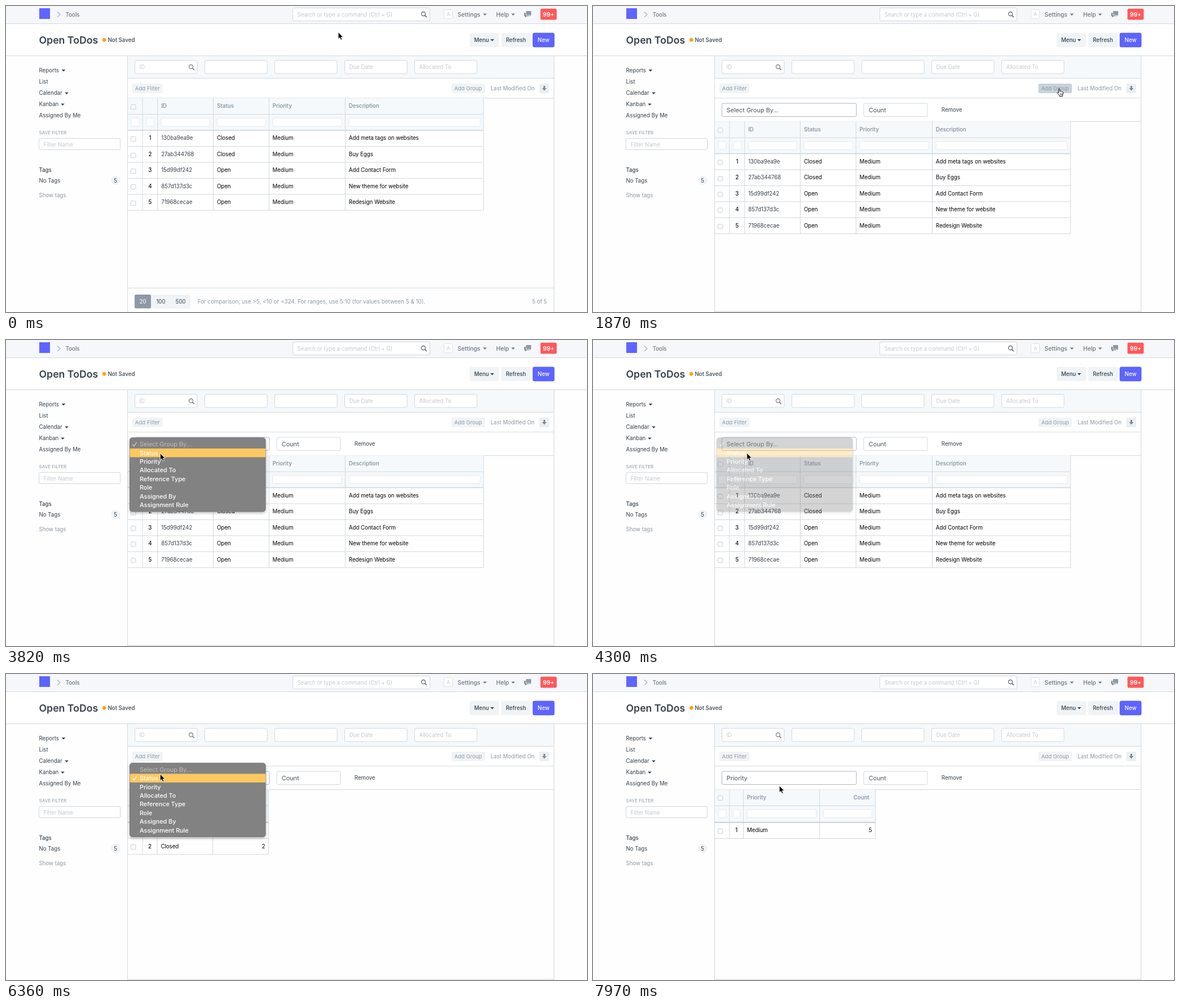
These frames come from a looping animation (1030 px wide and 544 px high, 8 s). An HTML page:

```html
<!DOCTYPE html>
<html lang="en">
<head>
<meta charset="utf-8">
<title>Open ToDos</title>
<style>
  html, body { margin: 0; width: 100%; height: 100%; overflow: hidden; background: #fefefe; }
  svg { display: block; width: 1030px; height: 544px; }
  text { font-family: Inter, "Open Sans", sans-serif; white-space: pre; }
</style>
</head>
<body>
<svg id="stage" xmlns="http://www.w3.org/2000/svg" viewBox="0 0 1030 544"></svg>
<script>
const LOOP = 8000, STEP = 120, ITEM = 15.48;
const LINE = '#d1d8dd', INK = '#36414c', MUTED = '#8d99a6', HINT = '#c3c9cf';
const BUTTON = '#f0f4f7', PRESSED = '#c8d3da', TINT = '#f5f9fc';

// Drawing helpers; text is placed by the middle of its capitals.
const text = (x, y, str, { fill = INK, size = 9.68, weight = 400, anchor = 'start' } = {}) =>
  `<text x="${x}" y="${y + size * 0.364}" fill="${fill}" font-size="${size}" font-weight="${weight}" text-anchor="${anchor}">${
    str.replace(/&/g, '&amp;').replace(/</g, '&lt;')}</text>`;
const rect = (x, y, x2, y2, fill, stroke = 'none', r = 0, attrs = '') =>
  `<rect x="${x}" y="${y}" width="${x2 - x}" height="${y2 - y}" fill="${fill}" stroke="${stroke}" rx="${r}" ${attrs}/>`;
const path = (d, fill = 'none', stroke = 'none', width = 1) =>
  `<path d="${d}" fill="${fill}" stroke="${stroke}" stroke-width="${width}"/>`;
const hLine = (x, x2, y, width = 1, color = LINE) => path(`M${x} ${y}H${x2}`, 'none', color, width);
const vLine = (x, y, y2) => path(`M${x} ${y}V${y2}`, 'none', LINE);
const caret = (x, y, fill = INK) => path(`M${x - 3.3} ${y - 1.5}h6.6l-3.3 3.5z`, fill);
const input = (x, y, x2, y2, hint = '', stroke = LINE) =>
  rect(x + .5, y + .5, x2 - .5, y2 - .5, '#fff', stroke, 2.5) + text(x + 8.5, (y + y2) / 2 + .5, hint, { fill: HINT });
const button = (x, y, x2, y2, label, style, fill = BUTTON, attrs = '') =>
  rect(x, y, x2, y2, fill, 'none', 2.5, attrs) + text((x + x2) / 2, (y + y2) / 2 + .1, label, { anchor: 'middle', ...style });
const lens = (x, y, color) =>
  `<circle cx="${x - 1}" cy="${y - 1}" r="3.5" fill="none" stroke="${color}" stroke-width="1.3"/>` +
  path(`M${x + 1.6} ${y + 1.6}l3.2 3.4`, 'none', color, 1.8);
const group = (id, body) => `<g id="${id}">${body}</g>`;

function header() {
  const nav = { fill: '#6c7680', size: 10.3, weight: 500 };
  return rect(0, 0, 1030, 31.5, '#f5f7fa') + hLine(0, 1030, 31.5) + rect(0, 32, 1030, 88, '#fff') + hLine(0, 1030, 88.5) +
    rect(59, 4, 78, 23, '#5e64ff') +
    path('M91 10.5l5 4.7-5 4.7', 'none', '#a4aeb7', 1.2) +
    text(105.7, 15.5, 'Tools', { fill: '#6c7680', weight: 500 }) +
    input(508, 3, 752, 27, 'Search or type a command (Ctrl + G)') + lens(741, 15, '#5f6973') +
    rect(776.5, 6.5, 791.5, 22.5, '#fff', '#dce2e6', 2) + text(784, 15, 'A', { fill: HINT, size: 9, anchor: 'middle' }) +
    text(800.5, 15, 'Settings', nav) + caret(849, 15, '#6c7680') +
    text(869, 15, 'Help', nav) + caret(899, 15, '#6c7680') +
    path('M922 9h9v7h-1v2.5l-2.5-2.5H922z', '#8d99a6') +
    path('M919 12h2v5h6v1h-4l-2.5 2.5V18H919z', '#6c7680') +
    button(947.5, 4.8, 976.3, 24.5, '99+', { fill: '#fff', size: 10.4, weight: 600 }, '#ff5858') +
    text(58.5, 60.5, 'Open ToDos', { size: 17.7, weight: 600 }) +
    '<circle cx="174.3" cy="60.3" r="3.3" fill="#ffa00a"/>' +
    text(180.5, 60.5, 'Not Saved', { weight: 600, fill: '#4f5963' }) +
    rect(822, 48, 874, 73, BUTTON, 'none', 2.5) + text(830, 60.5, 'Menu', { weight: 500 }) + caret(862, 60.5) +
    button(878, 48, 930, 73, 'Refresh', { weight: 500 }) +
    button(934, 48, 972, 73, 'New', { weight: 500, fill: '#fff' }, '#5e64ff', 'style="stroke:#444bff;stroke-width:.6"');
}

function sidebar() {
  const links = [['Reports', 102], ['List'], ['Calendar', 107.5], ['Kanban', 100.5], ['Assigned By Me']];
  return links.map(([label, x], i) => text(58.5, 114 + i * 20.2, label) + (x ? caret(x, 114.5 + i * 20.2) : '')).join('') +
    text(58.5, 225.5, 'SAVE FILTER', { size: 8.05, fill: MUTED }) + input(58, 235, 203, 256, 'Filter Name') +
    text(58.5, 291, 'Tags', { weight: 500 }) + text(58.5, 310, 'No Tags') +
    rect(186, 302, 202.5, 318, BUTTON, 'none', 8) + text(194.2, 310, '5', { anchor: 'middle' }) +
    text(58.5, 336, 'Show tags', { fill: MUTED });
}

function toolbar() {
  const hints = ['ID', '', '', 'Due Date', 'Allocated To'], small = { size: 9.6, fill: MUTED };
  return rect(216, 89, 971, 128.5, TINT) + hLine(216, 971, 128.5) + rect(216, 129, 971, 163.5, '#fff') +
    hints.map((hint, i) => input(228 + i * 124, 96, 339.5 + i * 124, 120.5, hint)).join('') + lens(329, 109, '#7a858f') +
    button(224, 138, 277.5, 155, 'Add Filter', small) +
    button(789.5, 138, 849, 155, 'Add Group', small, BUTTON, 'id="addGroup"') +
    text(859, 146.7, 'Last Modified On', { fill: MUTED }) +
    rect(945.5, 138, 963, 155, '#ebeff2', 'none', 2) + path('M952.8 142h3v4h2.4l-3.9 4.4-3.9-4.4h2.4z', '#7d8893') +
    hLine(216, 971, 163.8) + vLine(215.5, 89, 544) + vLine(971.5, 89, 544);
}

function groupRow() {
  const value = { size: 10.9, fill: '#4c545c' };
  return rect(216, 164.5, 971, 205, '#fff') + hLine(216, 971, 205.5) +
    input(228, 172.5, 467.5, 197, '', '#aeb7bf') + group('choice', text(236.8, 185.3, 'Select Group By...', value)) +
    input(479.5, 172.5, 593.5, 197) + text(488.7, 185.3, 'Count', value) +
    text(617.8, 184.3, 'Remove');
}

const columnWidth = { ID: 98.7, Status: 98.7, Count: 98.7, Priority: 135.2, Description: 245.2 };

// Every table starts with a checkbox column and a row number column.
function table(top, numberWidth, labels, rows) {
  const pivot = labels.includes('Count'), rowHeight = 28.4;
  const bodyTop = top + (pivot ? 58.6 : 57.4), bottom = bodyTop + rows.length * rowHeight;
  const xs = [215.5, 242, 242 + numberWidth];
  labels.forEach(label => xs.push(xs.at(-1) + columnWidth[label]));
  const right = xs.at(-1);
  const check = y => rect(221.5, Math.round(y) - 3.5, 230, Math.round(y) + 4.5, '#fff', '#c6cdd3', 1.5);
  const cell = (i, y, str, style, inset) => labels[i] === 'Count'
    ? text(right - inset, y, str, { ...style, anchor: 'end' })
    : text(xs[i + 2] + 6.4, y, str, style);

  let out = rect(216, top, right, bodyTop, TINT) + rect(216, bodyTop, right, bottom, '#fff') +
    check(top + 15) + hLine(216, right, top + 28.8);
  xs.slice(1).forEach((x, i) => { out += rect(xs[i] + 6.5, top + 35.5, x - 6, top + 50, '#fff', '#e3e9ee', 1.5); });
  labels.forEach((label, i) => { out += cell(i, top + 13.8, label, { fill: MUTED, weight: 600 }, 10.5); });
  rows.forEach((row, r) => {
    const y = bodyTop + r * rowHeight + 13.7;
    out += check(y + 1.3) + hLine(216, right, bodyTop + (r + 1) * rowHeight) +
      text((xs[1] + xs[2]) / 2, y, String(r + 1), { fill: '#111', weight: 500, anchor: 'middle' });
    row.forEach((str, i) => { out += cell(i, y, str, { fill: labels[i] === 'ID' ? INK : '#000' }, 6); });
  });
  xs.slice(1).forEach(x => { out += vLine(x, top, bottom); });
  return out + hLine(216, right, bodyTop - .2, pivot ? 2.2 : 1.6, '#cbd4d9');
}

const todos = [
  ['130ba9ea9e', 'Closed', 'Medium', 'Add meta tags on websites'],
  ['27ab344768', 'Closed', 'Medium', 'Buy Eggs'],
  ['15d99df242', 'Open', 'Medium', 'Add Contact Form'],
  ['857d137d3c', 'Open', 'Medium', 'New theme for website'],
  ['71968cecae', 'Open', 'Medium', 'Redesign Website']
];

function footer() {
  const note = 'For comparison, use >5, <10 or =324. For ranges, use 5:10 (for values between 5 & 10).';
  return hLine(216, 971, 501.3) + rect(228, 513, 327, 537.5, BUTTON, 'none', 2.5) +
    button(228, 513, 257, 537.5, '20', { fill: '#fff' }, MUTED) +
    button(257, 513, 292, 537.5, '100') + button(292, 513, 327, 537.5, '500') +
    text(339.5, 525.3, note, { fill: MUTED, size: 9.85 }) + text(959, 525.3, '5 of 5', { fill: MUTED, anchor: 'end' });
}

// The menu is drawn with its first item at y = 185.
const options = ['Select Group By...', 'Status', 'Priority', 'Allocated To', 'Reference Type', 'Role', 'Assigned By', 'Assignment Rule'];
function menu() {
  return rect(219.5, 173.8, 460, 305, '#828282', '#777', 4.5, 'filter="url(#shadow)"') +
    rect(219.5, 177.4, 460, 177.4 + ITEM, '#fcc860', 'none', 0, 'id="highlight"') +
    options.map((label, i) => text(237, 185.1 + i * ITEM, label, i
      ? { size: 10.8, weight: 500, fill: '#fff' }
      : { size: 10.9, fill: '#bcbcbc' })).join('') +
    '<path id="check" d="M224.5 185.3l2.6 3.4 4.4-6.8" fill="none" stroke-width="1.3"/>';
}

const arrow = path('M0 0V12.2L2.8 9.7 4.8 14 6.9 13 5 8.9H8.8Z', '#000', '#fff', .9);
const hand = path('M3 1.2C3 0 5 0 5 1.2V5.2L6 4.8 7.2 5.3 8.2 5.1 9.3 6 10.6 6.2C11.4 7 11.2 10 10 12V14H4.4V12.4L1.2 9.2C-.4 7.4 1 6.4 3 8.2Z', '#fff', '#111', 1) +
  path('M5.8 9v3M7.4 9v3M9 9v3', 'none', '#111', .7);

document.getElementById('stage').innerHTML =
  '<defs><filter id="shadow" x="-10%" y="-10%" width="120%" height="120%"><feDropShadow dx="0" dy="2" stdDeviation="2.5" flood-opacity=".28"/></filter></defs>' +
  rect(0, 0, 1030, 544, '#fefefe') + header() + sidebar() + toolbar() + group('groupRow', groupRow()) +
  group('lower', group('list', table(163.8, 26.8, ['ID', 'Status', 'Priority', 'Description'], todos)) + footer()) +
  group('byStatus', table(205.4, 26, ['Status', 'Count'], [['Open', '3'], ['Closed', '2']])) +
  group('byPriority', table(205.4, 24.6, ['Priority', 'Count'], [['Medium', '5']])) +
  group('menu', menu()) + group('arrow', arrow) + group('hand', hand);

// Each move runs along a quadratic curve, slowing down, in a few visible steps.
const home = [589, 46.5];
const moves = [
  { start: 690, steps: 1, via: home, to: [588, 82] },
  { start: 900, steps: 5, via: [340, 205], to: [822.5, 146.5] },
  { start: 2110, steps: 6, via: [740, 145], to: [334.8, 181.8] },
  { start: 3230, steps: 6, via: [290, 212], to: [272.8, 201] },
  { start: 4560, steps: 8, via: [424, 228], to: [560.7, 190.8] },
  { start: 5680, steps: 5, via: [430, 475], to: [273.2, 177.8] },
  { start: 6600, steps: 5, via: [271, 195], to: [273, 203] },
  { start: 7820, steps: 2, via: [340, 196], to: [330.3, 198.6] }
];
const easeOut = p => 1 - (1 - p) ** 2.4;

function cursorAt(t) {
  const i = moves.findLastIndex(move => move.start <= t);
  if (i < 0) return home;
  const { start, steps, via, to } = moves[i], from = i ? moves[i - 1].to : home;
  const s = easeOut(Math.min(1, (Math.floor((t - start) / STEP) + 1) / steps));
  return from.map((v, k) => (1 - s) ** 2 * v + 2 * s * (1 - s) * via[k] + s * s * to[k]);
}

// A picked item blinks once, then the menu fades for one step and closes.
const menus = [{ open: 2870, pick: 4060, checked: 0 }, { open: 6360, pick: 7310, checked: 1 }];

const el = id => document.getElementById(id);
const show = (id, on) => el(id).setAttribute('display', on ? 'inline' : 'none');
const move = (id, x, y) => el(id).setAttribute('transform', `translate(${x} ${y})`);
const choiceText = el('choice').firstChild;

function renderMenu(t, cursorY) {
  const current = menus.find(({ open, pick }) => t >= open && t < pick + 3 * STEP - 10);
  show('menu', current);
  if (!current) return;
  const { pick, checked } = current, top = 185 - checked * ITEM;
  const active = Math.round((cursorY - top) / ITEM), blink = t >= pick && t < pick + STEP;
  move('menu', 0, top - 185);
  el('menu').setAttribute('opacity', t >= pick + 2 * STEP ? .34 : 1);
  show('highlight', active > 0 && !blink);
  move('highlight', 0, active * ITEM);
  move('check', 0, checked * ITEM);
  el('check').setAttribute('stroke', checked ? '#fff' : '#ccc');
}

function render(t) {
  const [x, y] = cursorAt(t), isHand = t >= 1370 && t < 2110, grouped = t >= 1750;
  show('hand', isHand);
  show('arrow', !isHand);
  move(isHand ? 'hand' : 'arrow', x, y);
  show('groupRow', grouped);
  show('list', t < 4560);
  show('byStatus', t >= 4560 && t < 7820);
  show('byPriority', t >= 7820);
  move('lower', 0, grouped ? 41.5 : 0);
  el('addGroup').setAttribute('fill', t >= 1370 && t < 2870 ? PRESSED : BUTTON);
  choiceText.textContent = options[t < 4410 ? 0 : t < 7820 ? 1 : 2];
  renderMenu(t, y);
}

const start = performance.now();
function tick() {
  render((performance.now() - start) % LOOP);
  requestAnimationFrame(tick);
}
tick();
</script>
</body>
</html>
```
